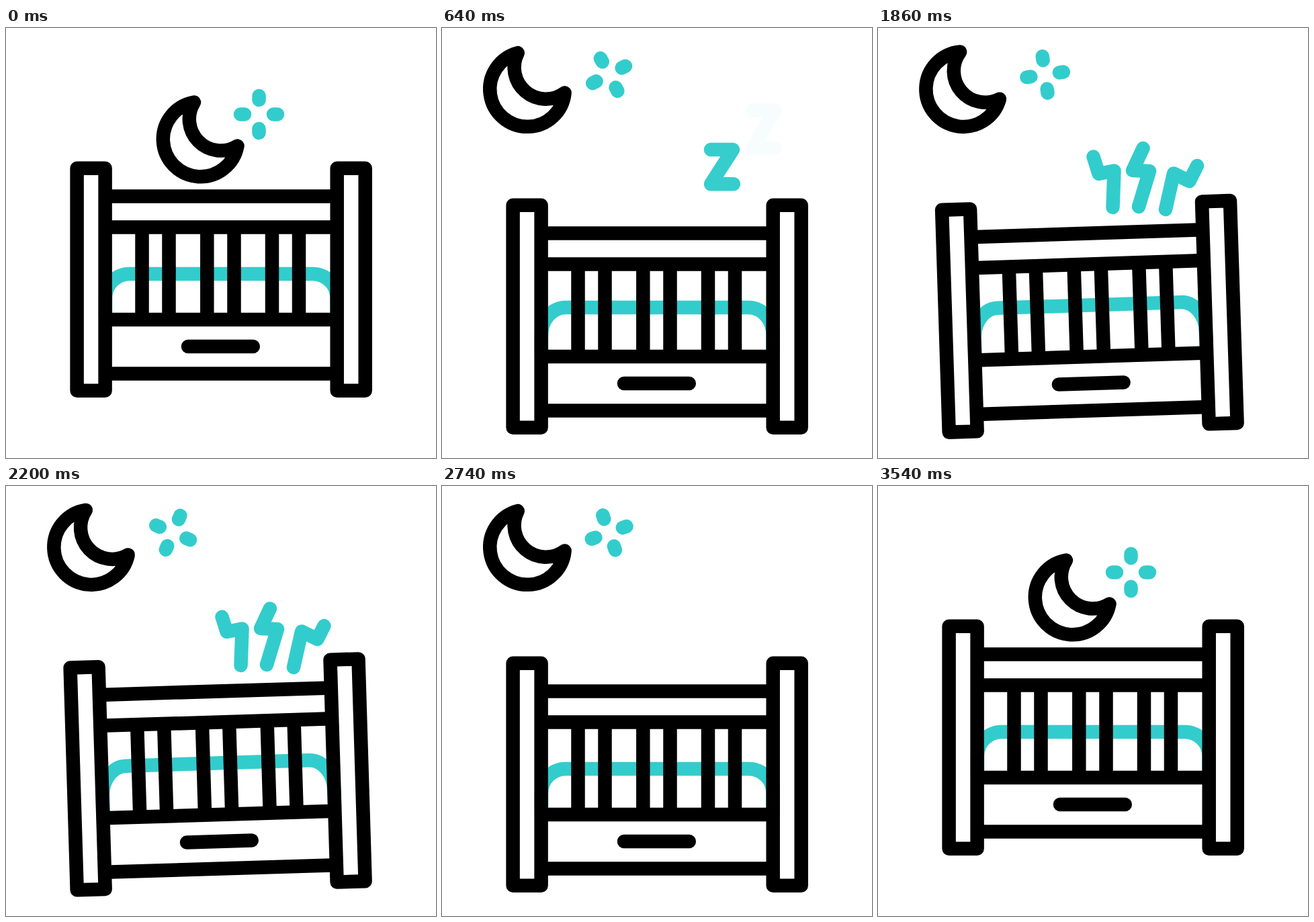
An HTML page for the animation above (3.6 s loop, 640 px wide and 640 px high).

```html
<!DOCTYPE html>
<html lang="en">
<head>
<meta charset="utf-8">
<title>Crib at night</title>
<style>
  html, body { margin: 0; width: 100%; height: 100%; overflow: hidden; background: #fff; }
  svg { display: block; width: 100vw; height: 100vh; }
  .line { fill: none; stroke: #000; stroke-width: 20.5; stroke-linejoin: round; }
  .round { stroke-linecap: round; }
  .teal { stroke: #3cc; }
</style>
</head>
<body>
<svg viewBox="0 0 640 640">
  <g id="crib">
    <path id="blanket" class="line teal"/>
    <path class="line" d="M148 250.5H492M148 296.5H492M148 434H492M148 514.5H492"/>
    <path class="line" d="M202.5 297V434M242.5 297V434M299.3 297V434M339.5 297V434M396 297V434M436 297V434"/>
    <rect class="line" x="105.6" y="208.8" width="42" height="331"/>
    <rect class="line" x="492.7" y="208.8" width="42" height="331"/>
    <path class="line round" d="M271 474H367.8"/>
  </g>
  <path id="moon" class="line round"
    d="M-9.5 -55.5A55.8 55.8 0 1 0 55 9.5A47 47 0 0 1 -9.5 -55.5Z"/>
  <path id="star" class="line round teal"
    d="M0 -27.5V-21.5M27.5 0H21.5M0 27.5V21.5M-27.5 0H-21.5"/>
  <path class="z line round teal" d="M400 181H433L400 232.3H434"/>
  <path class="z line round teal" d="M462 122.5H496L462 178.5H496"/>
  <path class="cry line round teal" pathLength="100" d="M349.5 267L351.5 212.5L328.5 217L320.5 191.5"/>
  <path class="cry line round teal" pathLength="100" d="M388 266L404 213L379 212L394.5 179"/>
  <path class="cry line round teal" pathLength="100" d="M428 270L440 216.5L463.5 228L475 205"/>
</svg>
<script>
const LOOP = 3600;
const byId = id => document.getElementById(id);
const crib = byId('crib'), blanket = byId('blanket'), moon = byId('moon'), star = byId('star');
const zs = document.querySelectorAll('.z'), cries = document.querySelectorAll('.cry');

const clamp = x => Math.min(1, Math.max(0, x));
const mix = (a, b, p) => a + (b - a) * p;
const ramp = (t, a, b) => clamp((t - a) / (b - a));
const ease = (t, a, b) => (1 - Math.cos(Math.PI * ramp(t, a, b))) / 2;

// Value at t from [time, value] keys, eased or linear between them
function track(t, keys, step = ease) {
  let i = 0;
  while (i < keys.length - 2 && t > keys[i + 1][0]) i++;
  const [a, from] = keys[i], [b, to] = keys[i + 1];
  return mix(from, to, step(t, a, b));
}

const SWAY = [[0, 0], [720, -5], [1770, 5], [2820, -5], [3540, 0]];
const SPIN = [[0, 0], [640, 62.4], [1300, 100.4], [1860, 171.8], [2200, 203], [2740, 250], [3540, 360]];
const BREATH = [[420, 0], [860, 10], [1300, 11], [1860, 8.6], [2220, 8.6], [2700, 0]];

const SHAKE = { start: 1583, step: 74.6, count: 14, angle: 4.05 };
function shake(t) {
  const u = (t - SHAKE.start) / SHAKE.step;
  if (u <= 0 || u >= SHAKE.count) return 0;
  const peak = k => k === 0 || k === SHAKE.count ? 0 : k % 2 ? SHAKE.angle : -SHAKE.angle;
  const k = Math.floor(u);
  return mix(peak(k), peak(k + 1), u - k);
}

function place(el, x, y, turn) {
  el.setAttribute('transform', `translate(${x} ${y}) rotate(${turn})`);
}

function draw(t) {
  const away = ease(t, 0, 580) - ease(t, 2950, 3540);

  crib.setAttribute('transform', `rotate(${shake(t)} 320 595) translate(0 ${55 * away})`);
  const rise = track(t, BREATH), ry = 36 + rise;
  blanket.setAttribute('d',
    `M148 430V402A36 ${ry} 0 0 1 184 ${402 - ry}H456.5A36 ${ry} 0 0 1 492.5 402V430`);

  place(moon, mix(289.5, 127, away), mix(166, 91.6, away), track(t, SWAY));
  place(star, mix(376.5, 248.6, away), mix(128.5, 69.4, away), track(t, SPIN, ramp));

  zs.forEach((z, i) => {
    z.style.opacity = ramp(t, 540 + i * 97, 643 + i * 97) - ramp(t, 1020 + i * 100, 1130 + i * 100);
  });

  const len = 100 * (ease(t, 1583, 1840) - ease(t, 2145, 2630));
  cries.forEach(c => {
    c.style.display = len > 0.2 ? '' : 'none';
    c.setAttribute('stroke-dasharray', len > 99.9 ? 'none' : `${len} 200`);
  });
}

const begin = performance.now();
function tick(now) {
  draw(Math.max(0, now - begin) % LOOP);
  requestAnimationFrame(tick);
}
draw(0);
requestAnimationFrame(tick);
</script>
</body>
</html>
```
